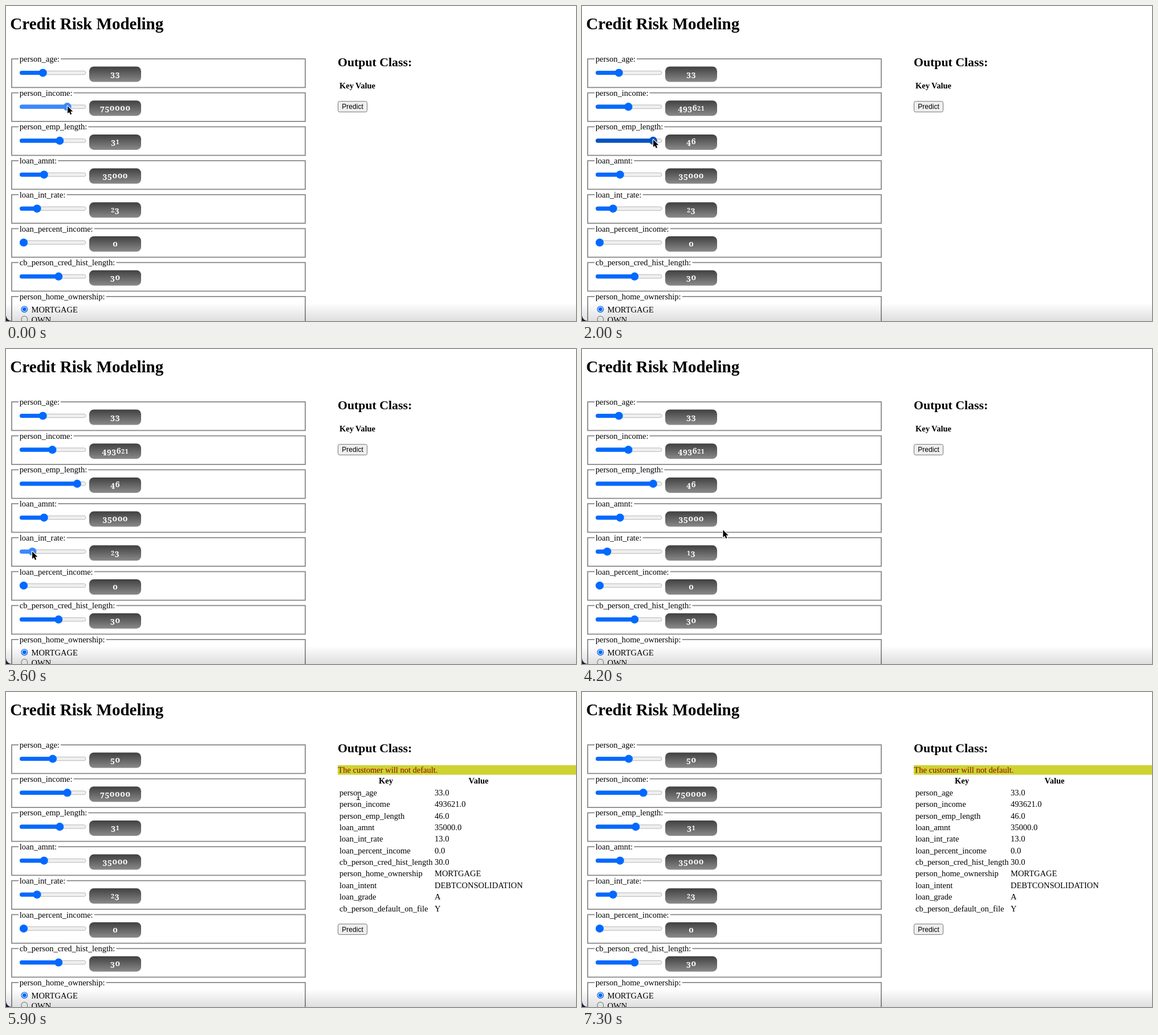
An HTML page with a canvas that plays this animation: 1000x554 px, repeating every 7.4 s.

```html
<!DOCTYPE html>
<html lang="en">
<head>
<meta charset="utf-8">
<title>Credit Risk Modeling</title>
<style>
  html, body { margin: 0; height: 100%; overflow: hidden; background: #fff; }
  canvas { display: block; }
</style>
</head>
<body>
<canvas id="stage" width="1000" height="554"></canvas>
<script>
const ctx = document.getElementById('stage').getContext('2d');
const LOOP = 7400, STEP = 100, RESULT_AT = 5400;
const SERIF = '"Liberation Serif", Times, serif';
const BODY = '14.5px ' + SERIF, BOLD = 'bold ' + BODY;
const BLUE = '#0069ff', BLUE_HOVER = '#0052c2', BLUE_ACTIVE = '#3b88fd';

// drag: [time, value] points; the pill only updates on release
const sliders = [
  { name: 'person_age', max: 100, start: 33, reset: 50 },
  { name: 'person_income', max: 1e6, start: 750000, drag: [[0, 750000], [500, 493621]], release: 600 },
  { name: 'person_emp_length', max: 50, start: 31, drag: [[1200, 31], [1800, 46]], release: 1900 },
  { name: 'loan_amnt', max: 1e5, start: 35000 },
  { name: 'loan_int_rate', max: 100, start: 23, drag: [[3300, 23], [3600, 15], [3800, 13]], release: 3900 },
  { name: 'loan_percent_income', max: 100, start: 0 },
  { name: 'cb_person_cred_hist_length', max: 50, start: 30 },
];

const results = [
  ['person_age', '33.0'], ['person_income', '493621.0'], ['person_emp_length', '46.0'],
  ['loan_amnt', '35000.0'], ['loan_int_rate', '13.0'], ['loan_percent_income', '0.0'],
  ['cb_person_cred_hist_length', '30.0'], ['person_home_ownership', 'MORTGAGE'],
  ['loan_intent', 'DEBTCONSOLIDATION'], ['loan_grade', 'A'], ['cb_person_default_on_file', 'Y'],
];

// [time, x, y]
const pointerPath = [
  [0, 108, 177], [500, 83, 177], [600, 82, 177], [800, 89, 213], [1000, 95, 236],
  [1200, 95, 236], [1800, 125, 236], [2000, 125, 236], [2200, 310, 270], [2400, 125, 300],
  [2700, 70, 340], [3100, 54, 357], [3300, 54, 357], [3600, 46, 357], [3800, 43, 357],
  [4000, 44, 358], [4350, 400, 290], [4600, 655, 200], [4700, 618, 182], [5900, 618, 183],
  [6500, 760, 240], [7000, 988, 18], [7100, 1020, 10],
];

function along(points, t, k = 1) {
  const i = points.findIndex(p => p[0] > t);
  if (i < 0) return points[points.length - 1][k];
  if (i === 0) return points[0][k];
  const a = points[i - 1], b = points[i];
  return a[k] + (b[k] - a[k]) * (t - a[0]) / (b[0] - a[0]);
}

function text(str, x, y, font = BODY, color = '#000', align = 'left') {
  ctx.font = font;
  ctx.fillStyle = color;
  ctx.textAlign = align;
  ctx.fillText(str, x, y);
}

function box(x, y, w, h, r, fill, stroke) {
  ctx.beginPath();
  ctx.roundRect(x, y, w, h, r);
  ctx.fillStyle = fill;
  ctx.fill();
  if (stroke) {
    ctx.strokeStyle = stroke;
    ctx.lineWidth = 1;
    ctx.stroke();
  }
}

function disc(x, y, r, fill) {
  ctx.beginPath();
  ctx.arc(x, y, r, 0, 7);
  ctx.fillStyle = fill;
  ctx.fill();
}

// Old-style figures: 0-2 at x-height, 3 4 5 7 9 below the baseline
function oldStyle(value, cx, y) {
  const glyphs = [...String(value)].map(d => {
    const font = `bold ${'12'.includes(d) ? 10.5 : 14}px "Noto Serif", serif`;
    const char = d === '0' ? 'o' : d;
    ctx.font = font;
    return { char, font, dy: '34579'.includes(d) ? 3 : 0, w: ctx.measureText(char).width + 0.6 };
  });
  let x = cx - glyphs.reduce((sum, g) => sum + g.w, 0) / 2;
  for (const g of glyphs) {
    text(g.char, x + 0.3, y + g.dy, g.font, '#fff');
    x += g.w;
  }
}

function fieldset(name, y, h) {
  ctx.strokeStyle = '#8f8f8f';
  ctx.lineWidth = 1.9;
  ctx.strokeRect(10, y, 515, h);
  ctx.font = BODY;
  ctx.fillStyle = '#fff';
  ctx.fillRect(22, y - 7, ctx.measureText(name + ':').width + 4, 14);
  text(name + ':', 23.8, y + 5);
}

function slider(s, i, t, px, py) {
  const top = 93 + 59.7 * i, cy = top + 24.5;
  let value = s.start, shown = s.start, color = BLUE;
  if (Math.abs(px - 82) < 60 && Math.abs(py - cy) < 6) color = BLUE_HOVER;
  if (t >= RESULT_AT) {
    value = shown = s.reset ?? s.start;
  } else if (s.drag) {
    value = along(s.drag, t);
    if (t >= s.release) shown = value;
    else if (t >= s.drag[0][0]) color = BLUE_ACTIVE;
  }
  fieldset(s.name, top, 50.3);

  const thumb = 31 + 102 * value / s.max;
  box(24.5, cy - 3.2, 115.5, 6.4, 3.2, '#efefef', '#b8b8b8');
  box(24, cy - 3.6, thumb - 24, 7.2, 3.6, color);
  disc(thumb, cy, 7.1, color);

  const shade = ctx.createLinearGradient(0, top + 13.5, 0, top + 40.5);
  shade.addColorStop(0, '#404040');
  shade.addColorStop(1, '#8a8a8a');
  box(146, top + 13.5, 91, 27, 8, shade);
  oldStyle(shown, 191.5, top + 31);
}

function radio(label, cy, on) {
  disc(32.3, cy, 5.9, on ? BLUE : '#767676');
  disc(32.3, cy, on ? 4.6 : 5, '#fff');
  if (on) disc(32.3, cy, 3.4, BLUE);
  text(label, 44.5, cy + 5.5);
}

function output(done, hover) {
  text('Output Class:', 582, 105.5, 'bold 21.8px ' + SERIF);
  if (done) {
    ctx.fillStyle = '#cdd330';
    ctx.fillRect(582, 128.7, 418, 16.8);
    text('The customer will not default.', 582.3, 142, BODY, '#8b0a0a');
    text('Key', 666.5, 161, BOLD, '#000', 'center');
    text('Value', 829, 161, BOLD, '#000', 'center');
    results.forEach(([key, value], i) => {
      text(key, 585, 182 + 20.35 * i);
      text(value, 752, 182 + 20.35 * i);
    });
  } else {
    text('Key', 585, 144.5, BOLD);
    text('Value', 613, 144.5, BOLD);
  }
  const y = done ? 408 : 167.7;
  box(582.5, y, 51, 18.6, 2.7, hover ? '#dedede' : '#efefef', '#767676');
  text('Predict', 608, y + 13.5, '12.1px "Liberation Sans", Arial, sans-serif', '#000', 'center');
}

function pointer(x, y, beam) {
  ctx.save();
  ctx.translate(x, y);
  const shape = new Path2D(beam
    ? 'M-3-6.5Q0-6.5 0-4.5Q0-6.5 3-6.5M0-4.5V4.5M-3 6.5Q0 6.5 0 4.5Q0 6.5 3 6.5M-1.5 2.5H1.5'
    : 'M0-1V12L3-.0L3 9.3L5 14L7.2 13L5.2 8.6H9.3Z'.replace('L3-.0L3 9.3', 'L2.9 9.4'));
  ctx.lineJoin = 'round';
  ctx.strokeStyle = '#fff';
  ctx.lineWidth = 2.4;
  ctx.stroke(shape);
  if (beam) {
    ctx.strokeStyle = '#222';
    ctx.lineWidth = 1.1;
    ctx.stroke(shape);
  } else {
    ctx.fillStyle = '#000';
    ctx.fill(shape);
  }
  ctx.restore();
}

function windowEdge() {
  const shadow = ctx.createLinearGradient(0, 522, 0, 554);
  shadow.addColorStop(0, 'rgba(0,0,0,0)');
  shadow.addColorStop(1, 'rgba(0,0,0,.13)');
  ctx.fillStyle = shadow;
  ctx.fillRect(0, 522, 1000, 32);
  ctx.fillStyle = '#1b1b38';
  ctx.fill(new Path2D('M0 544Q1 553 10 554H0Z'));
}

function draw(t) {
  const x = along(pointerPath, t), y = along(pointerPath, t, 2);
  const done = t >= RESULT_AT;
  ctx.fillStyle = '#fff';
  ctx.fillRect(0, 0, 1000, 554);
  text('Credit Risk Modeling', 7.3, 41, 'bold 29.06px ' + SERIF);
  sliders.forEach((s, i) => slider(s, i, t, x, y));
  fieldset('person_home_ownership', 511, 80);
  radio('MORTGAGE', 533.3, true);
  radio('OWN', 551, false);
  output(done, !done && x > 582 && x < 634 && y > 167 && y < 187);
  windowEdge();

  const overLegend = x > 22 && x < 142 && sliders.some((s, i) => Math.abs(y - 93 - 59.7 * i) < 7);
  const overTable = done && x > 584 && x < 750 && y > 170 && y < 390;
  pointer(x, y, overLegend || overTable);
}

let last = -1;
function tick(now) {
  const t = Math.floor(now % LOOP / STEP) * STEP;
  if (t !== last) draw(last = t);
  requestAnimationFrame(tick);
}
draw(0);
requestAnimationFrame(tick);
</script>
</body>
</html>
```
